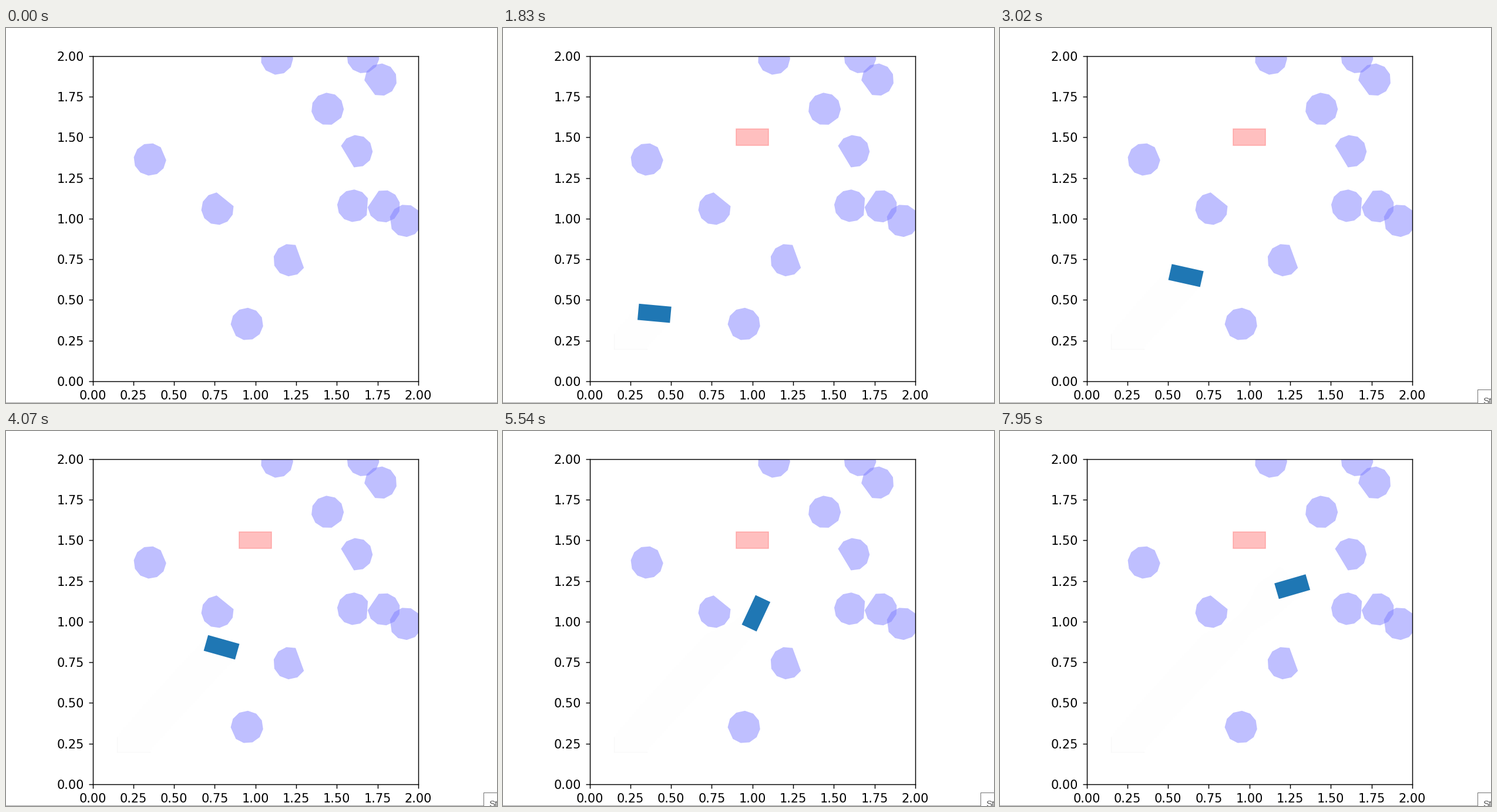
Write a matplotlib script that moves like this. It is 836 by 639 pixels and loops after 8000 ms.

```python
import numpy as np
import matplotlib.pyplot as plt
from matplotlib.animation import FuncAnimation
from matplotlib.collections import PolyCollection
from matplotlib.patches import Polygon, Rectangle

W, H, DPI = 836, 639, 150
LOOP, TICK = 8000, 20
SIDE = 554.4
START, TIP_ON = 70, 2880
RADIUS = 0.1

# centre, then direction and angular width of the longest flat side
OBSTACLES = [
    (1.132, 1.984, 245, 37), (1.661, 1.993, 307, 33), (1.769, 1.854, 216, 68),
    (1.443, 1.674, 306, 43), (0.352, 1.364, 23, 51), (1.620, 1.414, 211, 101),
    (0.767, 1.061, 51, 84), (1.602, 1.079, 356, 63), (1.789, 1.076, 146, 75),
    (1.923, 0.987, 188, 45), (1.210, 0.745, 20, 97), (0.948, 0.352, 204, 46),
]

# step, x, y, heading: approach, swing round, back off
ROUTE = np.array([
    (0, 0.250, 0.250, 0),
    (11, 0.398, 0.418, -5.2),
    (28, 0.610, 0.650, -12.6),
    (42, 0.792, 0.842, -15.7),
    (47, 0.853, 0.898, 5.5),
    (82, 1.223, 1.233, 135.5),
    (94, 1.263, 1.215, 196.2),
])

# one step about every 70 ms, with four stalls
BEATS = np.r_[np.arange(1130, 6600, 70), np.linspace(6670, 7950, 19)]
STEPS = np.delete(BEATS, [39, 83, 88, 90])


def hull(x, y, flat, width):
    """Corners spread evenly on a circle, leaving one wide flat side."""
    count = round((360 - width) / 31) + 1
    a = np.radians(flat + np.linspace(width / 2, 360 - width / 2, count))
    return np.column_stack([x + RADIUS * np.cos(a), y + RADIUS * np.sin(a)])


def car_corners(step):
    x, y, deg = (np.interp(step, ROUTE[:, 0], col) for col in ROUTE.T[1:])
    a = np.radians(deg)
    rot = np.array([[np.cos(a), -np.sin(a)], [np.sin(a), np.cos(a)]])
    box = np.array([(-0.1, -0.05), (0.1, -0.05), (0.1, 0.05), (-0.1, 0.05)])
    return box @ rot.T + (x, y)


POSES = [car_corners(n) for n in range(len(STEPS) + 1)]

plt.rcParams.update({"axes.linewidth": 0.7, "xtick.major.width": 0.7,
                     "ytick.major.width": 0.7})
fig = plt.figure(figsize=(W / DPI, H / DPI), dpi=DPI, facecolor="white")
ax = fig.add_axes([147.5 / W, 37 / H, SIDE / W, SIDE / H])
ax.set(xlim=(0, 2), ylim=(0, 2))

trail = PolyCollection([], facecolor="#fefefe", edgecolor="none", zorder=0.5)
ax.add_collection(trail, autolim=False)
rim, = ax.plot([0.15, 0.15, 0.35], [0.29, 0.2, 0.2], color="#f8f8f8",
               lw=0.5, zorder=0.6)

for spec in OBSTACLES:
    ax.add_patch(Polygon(hull(*spec), facecolor="#8080ff", edgecolor="none",
                         alpha=0.5))

goal = ax.add_patch(Rectangle((0.9, 1.45), 0.2, 0.1, color="#ff8080",
                              alpha=0.5, lw=0.8))
car = ax.add_patch(Polygon(POSES[0], facecolor="#1f77b4", edgecolor="none",
                           zorder=2))

# window edge and tooltip, in pixels from the top left
screen = fig.add_axes([0, 0, 1, 1])
screen.set(xlim=(0, W), ylim=(H, 0))
screen.axis("off")
screen.add_patch(Rectangle((0, 638), W, 1, facecolor="#a6a6a6", lw=0))
tip = [
    screen.add_patch(Rectangle((812.5, 615.5), 60, 60, facecolor="white",
                               edgecolor="#767676", lw=0.5)),
    screen.text(822, 640, "St", family="Liberation Sans", size=7.4,
                color="#575757", clip_on=True),
]


def draw(i):
    t = i * TICK + TICK / 2
    n = np.searchsorted(STEPS, t, side="right")
    for part in (car, goal, trail, rim):
        part.set_visible(t >= START)
    for part in tip:
        part.set_visible(t >= TIP_ON)
    car.set_xy(POSES[n])
    trail.set_verts(POSES[:n + 1])
    return [car, goal, trail, rim, *tip]


anim = FuncAnimation(fig, draw, frames=LOOP // TICK, interval=TICK,
                     init_func=lambda: draw(0), repeat=True, repeat_delay=0)
plt.show()
```
